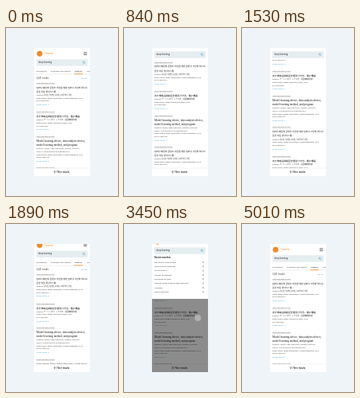
An HTML page with a canvas that plays this animation: 140x211 px, repeating every 5.13 s.

```html
<!DOCTYPE html>
<html lang="en">
<head>
<meta charset="utf-8">
<title>Search results</title>
<style>
html, body { margin: 0; width: 100%; height: 100%; overflow: hidden; background: #eef4f7; }
canvas { display: block; width: 140px; height: 211px; }
</style>
</head>
<body>
<canvas id="stage"></canvas>
<script>
const LOOP = 5130;
const W = 140, H = 211;
const SANS = '"Open Sans", "Noto Sans CJK KR", "Noto Sans CJK JP", "Noto Sans CJK", sans-serif';
const SERIF = '"Liberation Serif", "Noto Sans CJK KR", "Noto Sans CJK JP", "Noto Sans CJK", serif';
const INK = '#222', SOFT = '#444', BLUE = '#2f93c4', ORANGE = '#f28a24';
const PANEL = { x: 35, y: 25, w: 70, h: 161 };
const FOOT = 176, LEFT = 38, SHIFT = 10, REACH = 51;

const canvas = document.getElementById('stage');
const ctx = canvas.getContext('2d');
const ratio = window.devicePixelRatio || 1;
canvas.width = W * ratio;
canvas.height = H * ratio;

const papers = [
  {
    height: 36.5, size: 2.78,
    title: ['딥러닝 패턴의 콘텐츠 개선을 위한 딥러닝 기반의 텍스트', '문장 자동 생성시스템'],
    people: ['Inventor: 나도담, 차온별, 도하솔, 소마루와 두가람'],
    office: 'Patent Office, Patent Corporation / Patent application, 2018', code: 'KR 20180042517'
  },
  {
    height: 30.5, size: 2.85,
    title: ['走行車輌品質検証装置及び方法、電子機器'],
    people: ['Inventor: チーリン ホウ、トウ マオ | 北星無線研究所'],
    office: 'Patent Office, Patent Abstracts of Japan, 2018', code: 'JP 2018073925'
  },
  {
    height: 39.5, size: 3.45,
    title: ['Model learning device, data analysis device,', 'model learning method, and program'],
    people: ['Inventor: Yakuno, Soga; MIZUHARA, Kentaro; HOKUTEN', 'SIGNAL AND RADIOPHONE CORPORATION'],
    office: 'Patent Office, Patent Corporation / Patent application, 2018', code: 'WO 2018061840'
  }
];
const recent = [
  'algorithmic setup based', 'convolutional networks', 'architecture AI', 'Human recognition',
  'Resuming encoder', 'medical image analysis deep detection', 'Classifier', 'object detection'
];

const lerp = (a, b, k) => a + (b - a) * k;
const progress = (t, start, length) => Math.min(1, Math.max(0, (t - start) / length));
const easeOut = (p, power) => 1 - (1 - p) ** power;

// cubic-bezier(.25, .1, .25, 1), solved by bisection
function ease(p) {
  const bezier = (u, a, b) => 3 * a * u * (1 - u) ** 2 + 3 * b * u * u * (1 - u) + u ** 3;
  let lo = 0, hi = 1;
  for (let i = 0; i < 24; i++) {
    const mid = (lo + hi) / 2;
    if (bezier(mid, .25, .25) < p) lo = mid; else hi = mid;
  }
  return bezier(lo, .1, 1);
}

function rect(x, y, w, h, color) {
  ctx.fillStyle = color;
  ctx.fillRect(x, y, w, h);
}

function line(x1, y1, x2, y2, color, width = .5) {
  ctx.strokeStyle = color;
  ctx.lineWidth = width;
  ctx.beginPath();
  ctx.moveTo(x1, y1);
  ctx.lineTo(x2, y2);
  ctx.stroke();
}

function disc(x, y, r, color) {
  ctx.fillStyle = color;
  ctx.beginPath();
  ctx.arc(x, y, r, 0, 7);
  ctx.fill();
}

// Type is set at ten times its size, then scaled, so small sizes keep true widths.
function text(str, x, y, size, color, { font = SANS, weight = 400, align = 'left' } = {}) {
  ctx.save();
  ctx.translate(x, y);
  ctx.scale(.1, .1);
  ctx.font = `${weight} ${size * 10}px ${font}`;
  ctx.textAlign = align;
  ctx.textBaseline = 'middle';
  ctx.fillStyle = color;
  ctx.fillText(str, 0, 0);
  ctx.restore();
}

function clipped(x, y, w, h, draw) {
  ctx.save();
  ctx.beginPath();
  ctx.rect(x, y, w, h);
  ctx.clip();
  draw();
  ctx.restore();
}

function drawPaper(paper, y) {
  text('View translated version', LEFT, y, 2.1, SOFT);
  line(LEFT, y + 1.3, 61, y + 1.3, '#999', .3);
  let row = y + 5.7;
  for (const part of paper.title) {
    text(part, LEFT, row, paper.size, '#111', { font: SERIF });
    row += 5.2;
  }
  row -= .8;
  for (const part of paper.people) {
    text(part, LEFT, row, 2.1, INK);
    row += 3.7;
  }
  text(paper.office, LEFT, row, 2.1, INK);
  text(paper.code, LEFT, row + 3.4, 2.1, INK);
  text('Show more', LEFT, row + 8.2, 2.5, BLUE);
  line(52.3, row + 7.8, 53.1, row + 8.6, BLUE, .3);
  line(53.1, row + 8.6, 53.9, row + 7.8, BLUE, .3);
}

function drawPage(scroll) {
  const top = -scroll;
  text('Documents', LEFT, top + 54.5, 2.4, INK);
  text('Secondary documents', 56, top + 54.5, 2.4, INK);
  text('Patents', 86, top + 54.5, 2.4, INK, { weight: 600 });
  text('Authors', 101, top + 54.5, 2.4, INK);
  line(35, top + 58, 105, top + 58, '#dcdcdc');
  line(85, top + 57.7, 96, top + 57.7, ORANGE, .7);
  text('3,241 results', LEFT, top + 63, 2.6, INK);
  text('Sort by', 101.5, top + 63, 2.4, BLUE, { align: 'right' });
  let y = top + 69.3;
  for (let i = 0; y < FOOT + 4; i++) {
    const paper = papers[i % papers.length];
    drawPaper(paper, y);
    y += paper.height;
  }
}

function drawFooter() {
  rect(35, FOOT, 70, 10, '#fff');
  line(35, FOOT, 105, FOOT, '#e4e4e4');
  for (let i = 0; i < 3; i++) line(59.6 + i * .4, 180 + i, 62.2 - i * .4, 180 + i, INK, .5);
  text('Filter results', 63.5, 181, 2.6, '#111', { weight: 600 });
}

function drawHeader(lift) {
  const y = -lift;
  disc(42, 32.2 + y, 3.5, ORANGE);
  text('Tovexa', 48, 32.5 + y, 3.4, ORANGE);
  for (let i = 0; i < 3; i++) line(97, 30.7 + i * 1.5 + y, 101.3, 30.7 + i * 1.5 + y, '#444', .6);
}

function drawSearch(lift) {
  const y = 43.5 - lift;
  rect(38, y - 4.2, 64, 8.4, '#e6edf1');
  text('deep learning', 40.5, y, 2.6, INK);
  ctx.strokeStyle = BLUE;
  ctx.lineWidth = .45;
  ctx.beginPath();
  ctx.arc(97.2, y - .4, 1.1, 0, 7);
  ctx.stroke();
  line(98, y + .4, 99, y + 1.4, BLUE, .45);
}

function drawRecent(y) {
  text('Recent searches', LEFT, y, 2.5, '#222', { weight: 700 });
  recent.forEach((term, i) => {
    const row = y + 5.4 + i * 5.35;
    text(term, LEFT, row, 2.4, INK);
    line(98.2, row - .8, 99.8, row + .8, '#444', .4);
    line(99.8, row - .8, 98.2, row + .8, '#444', .4);
  });
}

function drawOverlay(open, touch) {
  rect(PANEL.x, PANEL.y, PANEL.w, PANEL.h, `rgba(0,0,0,${.45 * open})`);
  if (touch > 0) disc(92.3, 118, 4, `rgba(205,205,205,${.55 * touch})`);
  const bottom = lerp(49, 94, open);
  clipped(PANEL.x, PANEL.y, PANEL.w, bottom - PANEL.y, () => {
    rect(PANEL.x, PANEL.y, PANEL.w, bottom - PANEL.y, '#fff');
    drawHeader(SHIFT * open);
    drawRecent(52.5 - SHIFT * open);
    rect(35, 39 - SHIFT * open, 70, 9.5, '#fff');
    drawSearch(SHIFT * open);
  });
}

function drawScene(t) {
  const down = ease(progress(t, 600, 800));
  const back = easeOut(progress(t, 1710, 510), 5);
  const scroll = REACH * down * (1 - back);
  const open = easeOut(progress(t, 2655, 450), 3) * (1 - easeOut(progress(t, 3735, 420), 3));
  const touch = progress(t, 3200, 180) * (1 - progress(t, 3640, 150));

  ctx.setTransform(ratio, 0, 0, ratio, 0, 0);
  rect(0, 0, W, H, '#eef4f7');
  clipped(PANEL.x, PANEL.y, PANEL.w, PANEL.h, () => {
    rect(PANEL.x, PANEL.y, PANEL.w, PANEL.h, '#fff');
    drawPage(scroll);
    drawFooter();
    if (open > 0) {
      drawOverlay(open, touch);
    } else {
      const lift = Math.min(scroll, SHIFT);
      rect(35, 25, 70, 24 - lift, '#fff');
      drawHeader(scroll);
      rect(35, 39 - lift, 70, 10, '#fff');
      drawSearch(lift);
    }
  });
}

function tick() {
  drawScene(performance.now() % LOOP);
  requestAnimationFrame(tick);
}
tick();
</script>
</body>
</html>
```
